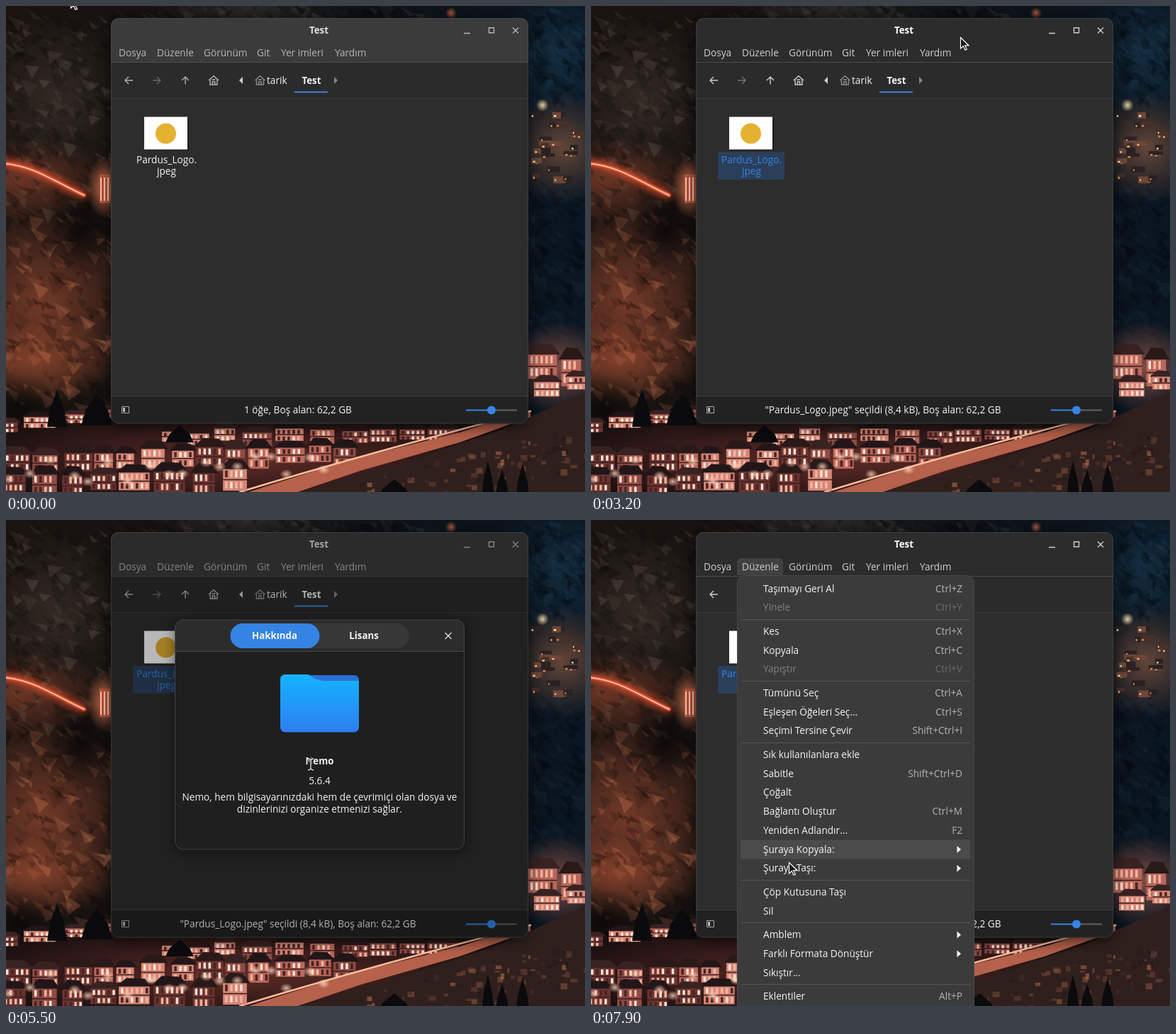
Animation, 817 px wide and 686 px high, one loop 8 s. Source, as an HTML page with a canvas:

```html
<!DOCTYPE html>
<html lang="tr">
<head>
<meta charset="utf-8">
<title>Test</title>
<style>
html, body { margin: 0; width: 100%; height: 100%; overflow: hidden; background: #0c0e12; }
canvas, svg { position: absolute; left: 0; top: 0; width: 817px; height: 686px; overflow: hidden; }
text { font: 13.65px "Open Sans", "Noto Sans", sans-serif; fill: #f4f4f4; cursor: default; }
.b { font-weight: 700; font-size: 13.3px; }
.m { text-anchor: middle; }
.e { text-anchor: end; }
.bar text { fill: #cfcfcf; }
.bar .b { fill: #fff; }
.ico { fill: none; stroke: #cdcdcd; stroke-width: 1.4; }
#dialog { filter: drop-shadow(0 3px 9px rgba(0, 0, 0, .5)); }
</style>
</head>
<body>
<canvas id="photo" width="817" height="686"></canvas>
<svg id="stage" viewBox="0 0 817 686">
  <defs>
    <path id="home" d="M-7 0 0-6.2 7 0M-5-1.5V6H5V-1.5M-1.7 6V2H1.7V6M-2.5-1H2.5" />
    <clipPath id="frame"><rect x="148" y="17" width="589" height="572.5" rx="11" /></clipPath>
    <linearGradient id="blue" x2="0" y2="1">
      <stop stop-color="#14b4ff" /><stop offset="1" stop-color="#2e7ef0" />
    </linearGradient>
  </defs>
  <g clip-path="url(#frame)">
    <path fill="#2d2d2d" d="M148 17h589v573H148z" />
    <path fill="#2c2c2c" d="M148 17h589v63H148z" />
    <path id="backdrop" fill="#3b3b3b" d="M148 17h589v63H148z" />
    <path fill="#2b2b2b" d="M148 80h589v50H148z" />
    <path fill="#222" d="M148 551h589v39H148z" />
    <path fill="#4c4c4c" d="M148 79h589v1H148z" />
    <path fill="#3b3b3b" d="M148 130h589v1H148zM148 550h589v1H148z" />
    <path id="openTab" fill="#414141" />
    <g id="head" class="bar">
      <text class="b m" x="441.5" y="39">Test</text>
      <text x="159" y="70.5">Dosya</text><text x="213" y="70.5">Düzenle</text>
      <text x="279" y="70.5">Görünüm</text><text x="354" y="70.5">Git</text>
      <text x="388" y="70.5">Yer imleri</text><text x="464" y="70.5">Yardım</text>
      <path class="ico" stroke-width="1.2" d="M646 38.5h9M681.5 30.8h7v7h-7zM715 30.5l8 8m0-8-8 8" />
      <path class="ico" d="M179 105H168m5-5-5 5 5 5M253 110.500V100m-5 5 5-5 5 5" />
      <path class="ico" opacity=".45" d="M207 105h11m-5-5 5 5-5 5" />
      <use href="#home" class="ico" x="293" y="105" />
    </g>
    <path fill="#d0d0d0" d="M334 100v10l-5-5z" />
    <path fill="#858585" d="M463 100v10l5-5z" />
    <use href="#home" class="ico" x="358.500" y="105" opacity=".6" />
    <text x="368" y="109.500">tarik</text>
    <text class="b m" x="431" y="109.500">Test</text>
    <path fill="#3584e4" d="M407 120.500h47v2h-47z" />
    <path fill="#111" opacity=".6" d="M196 158h62v46h-62z" />
    <path fill="#fff" d="M195 156.500h61v46h-61z" />
    <circle cx="225.500" cy="180" r="14.500" fill="#e5b130" />
    <rect id="mark" x="179" y="206" width="94" height="39" rx="2" fill="#2b3f5b" />
    <g id="label">
      <text class="m" x="226.500" y="221.500">Pardus_Logo.</text>
      <text class="m" x="226.500" y="238">jpeg</text>
    </g>
    <path fill="none" stroke="#aaa" d="M163.500 565.500h10v9h-10z" />
    <path fill="#bbb" d="M165 567h3v6h-3z" />
    <text id="status" class="m" x="412" y="575"></text>
    <path fill="#636363" d="M685 569.500h36v2h-36z" />
    <path fill="#3584e4" d="M649 569.500h36v2h-36z" />
    <circle cx="685" cy="570.500" r="6" fill="#3584e4" />
    <path id="dim" d="M148 17h589v573H148z" />
  </g>
  <rect x="148.500" y="17.500" width="588" height="571.500" rx="11" fill="none" stroke="#666" stroke-opacity=".3" />
  <g id="menus"></g>
  <g id="dialog"></g>
  <g id="pointer">
    <path id="arrow" fill="#151515" stroke="#fff" stroke-width="1.2" d="M.5.5V16l3.800-3.400 2.600 5.700 2.400-1.100-2.600-5.500h5.300z" />
    <g id="beam" fill="none">
      <path id="beamLine" stroke="#111" stroke-width="3.500" d="M-4-8q3 0 4 2 1-2 4-2M0-6V6M-4 8q3 0 4-2 1 2 4 2" />
      <use href="#beamTop" />
      <path stroke="#fff" stroke-width="1.300" d="M-4-8q3 0 4 2 1-2 4-2M0-6V6M-4 8q3 0 4-2 1 2 4 2" />
    </g>
  </g>
</svg>
<script>
const $ = id => document.getElementById(id);
const clamp = v => Math.max(0, Math.min(1, v));
const ramp = (t, a, b) => clamp((t - a) / (b - a));

function el(tag, attrs, parent, text) {
  const node = document.createElementNS('http://www.w3.org/2000/svg', tag);
  for (const k in attrs) node.setAttribute(k, attrs[k]);
  if (text) node.textContent = text;
  parent.append(node);
  return node;
}

/* Night town behind the window */
function paintPhoto() {
  const c = $('photo').getContext('2d');
  let seed = 11;
  const rnd = (a = 0, b = 1) => a + (b - a) * ((seed = seed * 16807 % 2147483647) / 2147483647);
  const pick = list => list[Math.floor(rnd(0, list.length))];
  const rect = (color, x, y, w, h) => { c.fillStyle = color; c.fillRect(x, y, w, h); };
  function poly(color, ...p) {
    c.fillStyle = color;
    c.beginPath();
    for (let i = 0; i < p.length; i += 2) c.lineTo(p[i], p[i + 1]);
    c.fill();
  }
  function glow(x, y, rx, ry, color, a) {
    c.save();
    c.translate(x, y);
    c.scale(rx, ry);
    c.globalAlpha = a;
    const g = c.createRadialGradient(0, 0, 0, 0, 0, 1);
    g.addColorStop(0, color);
    g.addColorStop(1, color + '00');
    c.fillStyle = g;
    c.fillRect(-1, -1, 2, 2);
    c.restore();
  }
  function rocks(n, x0, x1, y0, y1, dark, light) {
    for (let i = 0; i < n; i++) {
      const x = rnd(x0, x1), y = rnd(y0, y1), s = rnd(6, 26);
      c.globalAlpha = rnd(.06, .34);
      poly(rnd() < .62 ? dark : light, x, y, x + s, y + s * rnd(.1, .7), x + s * rnd(.2, .9), y + s * rnd(.6, 1.2));
    }
    c.globalAlpha = 1;
  }
  function house(x, y, w, h) {
    const wall = pick(['#b8675c', '#d48677', '#8d4b45', '#6a3532']);
    rect(wall, x, y, w, h);
    rect('#3a1c1c', x, y + h * .48, w, 1.5);
    for (let r = 0; r < 2; r++)
      for (let i = x + 3; i < x + w - 4; i += 7)
        rect(pick(['#ffe3d2', '#f5b39c', '#4a2322']), i, y + 3 + r * h * .5, 3.5, h * .3);
    poly(pick(['#2a1919', '#382222', '#221618']), x - 4, y + 1, x + w * .25, y - h * .42, x + w * .85, y - h * .38, x + w + 5, y + 1);
  }
  function row(x0, x1, y0, y1, h) {
    for (let x = x0; x < x1;) {
      const w = rnd(24, 46);
      house(x, y0 + (y1 - y0) * (x - x0) / (x1 - x0) + rnd(-4, 4), w, h * rnd(.8, 1.15));
      x += w + rnd(2, 12);
    }
  }
  const base = c.createLinearGradient(0, 0, 817, 0);
  base.addColorStop(0, '#1b1411');
  base.addColorStop(.3, '#15110f');
  base.addColorStop(.65, '#0d1116');
  base.addColorStop(1, '#0a1622');
  rect(base, 0, 0, 817, 686);
  glow(70, 130, 100, 120, '#4a4138', .5);
  glow(20, 245, 130, 60, '#a04a30', .6);
  glow(50, 420, 140, 150, '#914730', .75);
  glow(40, 500, 120, 60, '#c05a38', .5);
  glow(350, 0, 160, 40, '#3a3936', .6);
  glow(780, 70, 100, 90, '#17364c', .7);
  glow(785, 200, 80, 80, '#9c6547', .6);
  rocks(240, -20, 150, 0, 290, '#090808', '#6b5c50');
  rocks(260, -20, 150, 280, 560, '#0c0808', '#c57452');
  rocks(130, 730, 820, 0, 130, '#04080e', '#1d3c54');
  rocks(150, 730, 820, 245, 470, '#03060b', '#1c2e40');
  rocks(90, 140, 600, -10, 16, '#070707', '#4a463f');
  glow(105, 315, 50, 65, '#0a0808', .9);
  glow(15, 570, 60, 50, '#0a0707', .8);

  c.lineCap = 'round';
  c.shadowColor = '#ff5c38';
  c.shadowBlur = 12;
  for (const [width, color] of [[6, '#c9472f'], [2, '#ffc09a']]) {
    c.lineWidth = width;
    c.strokeStyle = color;
    c.beginPath();
    c.moveTo(-4, 222);
    c.bezierCurveTo(40, 226, 65, 246, 110, 267);
    c.stroke();
  }
  c.shadowBlur = 0;
  glow(140, 256, 26, 44, '#ff8a60', .8);
  rect('#b85440', 132, 238, 15, 40);
  for (let x = 133; x < 148; x += 5) rect('#ffc6a4', x, 242, 2, 33);

  for (let i = 0; i < 26; i++) {
    const x = rnd(735, 812), y = rnd(138, 242);
    rect(pick(['#2a2222', '#45302a', '#6d4737']), x, y, rnd(10, 22), rnd(5, 10));
    rect(pick(['#ffb36b', '#ffe0b4', '#e8834c']), x + 2, y + 4, rnd(1.5, 4), 2.5);
  }
  glow(757, 140, 9, 9, '#ffe4b0', .9);
  glow(628, 10, 8, 8, '#d56a45', .8);

  rect('#1b1011', 0, 588, 817, 98);
  glow(330, 640, 380, 70, '#7b372f', .7);
  glow(780, 510, 75, 65, '#b06452', .7);
  row(737, 800, 488, 500, 34);
  row(745, 830, 532, 520, 20);
  row(-10, 148, 586, 570, 14);
  row(220, 640, 600, 592, 18);
  row(-10, 500, 632, 618, 26);
  poly('#30201d', 400, 690, 560, 645, 700, 598, 817, 545, 817, 690);
  for (let i = 0; i < 110; i++) {
    const x = rnd(480, 817), y = Math.max(600, 686 - (x - 440) * .27) + rnd(0, 60);
    c.globalAlpha = rnd(.1, .45);
    rect(pick(['#e58a5e', '#8e5240', '#120d10']), x, y, rnd(2, 10), rnd(2, 9));
  }
  c.globalAlpha = 1;
  poly('#b5614b', 330, 690, 480, 642, 640, 602, 740, 570, 740, 580, 640, 616, 500, 656, 400, 690);
  c.lineWidth = 2.5;
  c.strokeStyle = '#ffbe9b';
  c.beginPath();
  c.moveTo(330, 686);
  c.quadraticCurveTo(500, 634, 740, 572);
  c.stroke();
  row(-12, 330, 664, 654, 28);
  for (let x = 4; x < 460; x += rnd(18, 34)) glow(x, 664 - x * .02 + rnd(-24, 14), 9, 7, '#ffd3ba', .8);
  for (const [x, y, w, h] of [[680, 668, 9, 26], [700, 676, 10, 22], [729, 672, 10, 26], [548, 682, 24, 14], [72, 568, 14, 26], [245, 604, 20, 12], [128, 570, 22, 22]])
    poly('#0b0a0d', x - w, y + h, x - w * .7, y, x, y - h, x + w * .7, y, x + w, y + h);

  c.shadowColor = 'rgba(0,0,0,.65)';
  c.shadowBlur = 22;
  c.shadowOffsetY = 4;
  c.fillStyle = '#222';
  c.beginPath();
  c.roundRect(149, 18, 587, 571, 11);
  c.fill();
}

/* Menus: "-" separator, "~" disabled, ">" submenu, "|" shortcut */
function menu(x, y, w, items) {
  const g = el('g', {}, $('menus')), right = x + w, rows = [];
  const box = el('rect', { x: x + .5, y: y + .5, width: w - 1, rx: 11, fill: '#3b3b3b', stroke: '#484848' }, g);
  const lit = el('rect', { x: x + 5, width: w - 11, height: 26.75, fill: '#4b4b4b' }, g);
  let cy = y + 19;
  for (const item of items) {
    if (item === '-') {
      el('rect', { x: x + 6, y: Math.round(cy - 10.500), width: w - 12, height: 1, fill: '#565656' }, g);
      cy += 6.75;
      continue;
    }
    const [name, key] = item.replace(/[~>]/g, '').split('|');
    const off = item[0] === '~';
    el('text', { x: x + 37, y: cy + 4.700, style: off ? 'fill:#808080' : '' }, g, name);
    if (key) el('text', { x: right - 17, y: cy + 4.700, class: 'e', style: `fill:${off ? '#6c6c6c' : '#b4b4b4'}` }, g, key);
    if (item.endsWith('>')) el('path', { d: `M${right - 24.500} ${cy - 5}v10l5.500-5z`, fill: '#f4f4f4' }, g);
    rows.push(cy);
    cy += 26.75;
  }
  box.setAttribute('height', cy - y - 8);
  return (opacity, pointerY) => {
    g.style.display = opacity ? '' : 'none';
    g.style.opacity = opacity;
    const hit = rows.find(r => Math.abs(r - pointerY) <= 13.4);
    lit.style.display = hit ? '' : 'none';
    if (hit) lit.setAttribute('y', hit - 13.4);
  };
}
const fileMenu = menu(236, 208, 253, ['Resim Görüntüleyici İle Aç', '-', 'Birlikte Aç>', '-', 'Kes', 'Kopyala', 'Çoğalt', '-',
  'Sık kullanılanlara ekle', 'Sabitle', 'Bağlantı Oluştur', 'Yeniden Adlandır...', '-', 'Çöp Kutusuna Taşı', 'Sil', '-',
  'Amblem>', 'Farklı Formata Dönüştür>', 'Sıkıştır...', '-', 'Özellikler']);
const helpMenu = menu(457, 78, 233, ['Tüm Konular|F1', 'Klavye Kısayolları|Ctrl+F1', 'Hakkında']);
const editMenu = menu(206, 78, 335, ['Taşımayı Geri Al|Ctrl+Z', '~Yinele|Ctrl+Y', '-', 'Kes|Ctrl+X', 'Kopyala|Ctrl+C', '~Yapıştır|Ctrl+V', '-',
  'Tümünü Seç|Ctrl+A', 'Eşleşen Öğeleri Seç...|Ctrl+S', 'Seçimi Tersine Çevir|Shift+Ctrl+I', '-',
  'Sık kullanılanlara ekle', 'Sabitle|Shift+Ctrl+D', 'Çoğalt', 'Bağlantı Oluştur|Ctrl+M', 'Yeniden Adlandır...|F2',
  'Şuraya Kopyala:>', 'Şuraya Taşı:>', '-', 'Çöp Kutusuna Taşı', 'Sil', '-',
  'Amblem>', 'Farklı Formata Dönüştür>', 'Sıkıştır...', '-', 'Eklentiler|Alt+P', 'Tercihler']);

/* About dialog: every part passes through a bending map */
const W = 408, H = 324;
const levels = [0, .14, .24, .49, .8, 1];
// per level: left, middle and right point of the bent row
const opening = [
  [290, 322, 376, 362, 457, 315], [293, 350, 386, 407, 457, 335], [318, 400, 432, 433, 470, 425],
  [335, 436, 434, 443, 470, 432], [405, 487, 435, 472, 457, 447], [410, 503, 440, 485, 459, 455]];
const closing = [
  [400, 248, 535, 306, 545, 288], [402, 285, 541, 312, 563, 308], [425, 310, 545, 318, 565, 312],
  [450, 340, 548, 330, 566, 313], [498, 368, 545, 350, 564, 315], [480, 395, 545, 372, 570, 320]];

function bend(pose, k, x, y) {
  const u = x / W, v = y / H;
  const wt = [2 * (u - .5) * (u - 1), 4 * u * (1 - u), 2 * u * (u - .5)];
  const at = (r, axis) => wt.reduce((sum, q, i) => sum + q * pose[r][2 * i + axis], 0);
  let i = 0;
  while (i < 4 && v > levels[i + 1]) i++;
  const f = (v - levels[i]) / (levels[i + 1] - levels[i]);
  return [238.5 + x, 141 + y].map((flat, axis) => flat * k + (at(i, axis) * (1 - f) + at(i + 1, axis) * f) * (1 - k));
}
function outline(x, y, w, h, r) {
  const pts = [], out = [];
  [[x + w - r, y + r], [x + w - r, y + h - r], [x + r, y + h - r], [x + r, y + r]].forEach(([cx, cy], q) => {
    for (let i = 0; i <= 8; i++) {
      const a = (q - 1 + i / 8) * Math.PI / 2;
      pts.push([cx + r * Math.cos(a), cy + r * Math.sin(a)]);
    }
  });
  pts.forEach((p, i) => {
    const next = pts[(i + 1) % pts.length], n = Math.ceil(Math.hypot(next[0] - p[0], next[1] - p[1]) / 12) || 1;
    for (let j = 0; j < n; j++) out.push([p[0] + (next[0] - p[0]) * j / n, p[1] + (next[1] - p[1]) * j / n]);
  });
  return out;
}
const parts = [], words = [];
function part(pts, attrs) {
  const node = el('path', attrs, $('dialog'));
  parts.push([node, pts]);
  return node;
}
function word(x, y, text, cls = '') {
  words.push([el('text', { class: 'm ' + cls }, $('dialog'), text), x, y]);
}
const card = outline(0, 0, W, H, 12);
part(card, { fill: '#1f1f1f' });
part(card.map(([x, y]) => [x, Math.min(y, 44)]), { fill: '#2c2c2c' });
part(outline(0, 44, W, 1, 0), { fill: '#434343' });
part(card, { fill: 'none', stroke: '#555', 'stroke-opacity': .7 });
part(outline(78, 5, 252, 35, 17.5), { fill: '#373737' });
part(outline(78, 5, 126, 35, 17.5), { fill: '#3584e4' });
const closeHover = part(outline(369.5, 6.5, 32, 32, 16), { fill: '#3d3d3d' });
const mid = [385.5, 22.5];
part([[381, 18], mid, [390, 27], mid, [390, 18], mid, [381, 27], mid], { fill: 'none', stroke: '#ddd', 'stroke-width': 1.3 });
part(outline(148.5, 78, 111, 70, 7), { fill: '#2a70d4' });
part(outline(148.5, 77, 111, 81.5, 7).map(([x, y]) => [x, Math.max(y, 77 + 9 * clamp((x - 188) / 14))]), { fill: 'url(#blue)' });
word(140.5, 27, 'Hakkında', 'b');
word(266.5, 27, 'Lisans', 'b');
word(204, 204, 'Nemo', 'b');
word(204, 231.5, '5.6.4');
word(204, 255, 'Nemo, hem bilgisayarınızdaki hem de çevrimiçi olan dosya ve');
word(204, 271.5, 'dizinlerinizi organize etmenizi sağlar.');

function drawDialog(t) {
  const shown = t >= 4400 && t < 6800, leaving = t >= 6500;
  $('dialog').style.display = shown ? '' : 'none';
  if (!shown) return;
  const pose = leaving ? closing : opening;
  const s = leaving ? 1 - ramp(t, 6400, 6700) : ramp(t, 4400, 4800);
  const k = s * (2 - s);
  $('dialog').style.opacity = leaving ? .35 + .65 * s : .5 + .5 * k;
  closeHover.style.display = t >= 6100 && !leaving ? '' : 'none';
  const map = (x, y) => bend(pose, k, x, y);
  for (const [node, pts] of parts)
    node.setAttribute('d', 'M' + pts.map(p => map(...p).map(n => n.toFixed(2))).join('L') + 'Z');
  for (const [node, x, y] of words) {
    const p = map(x, y), a = map(x + 1, y), b = map(x, y + 1);
    node.setAttribute('transform', `matrix(${[a[0] - p[0], a[1] - p[1], b[0] - p[0], b[1] - p[1], ...p]})`);
  }
}

// pointer route: time, x, y
const route = [[200, 91, -13], [300, 62, 2], [400, 28, 10], [600, 120, 105], [800, 222, 195], [900, 235, 207],
  [2300, 235, 207], [2400, 230, 180], [2600, 202, 104], [3100, 202, 104], [3200, 521, 44], [3300, 521, 44],
  [3500, 484, 62], [3900, 490, 152], [4200, 490, 152], [4400, 494, 183], [4800, 462, 330], [5100, 447, 387],
  [5500, 430, 345], [5700, 430, 345], [6100, 636, 157], [6200, 636, 157], [6300, 627, 150], [6400, 627, 150],
  [6700, 63, 60], [7200, 238, 62], [7300, 238, 62], [7400, 244, 92], [7800, 277, 462], [7900, 279, 483]];
function pointerAt(t) {
  const i = route.findIndex(p => p[0] >= t);
  if (i < 1) return route[0].slice(1);
  const [a, b] = [route[i - 1], route[i]], f = ramp(t, a[0], b[0]);
  return [a[1] + (b[1] - a[1]) * f, a[2] + (b[2] - a[2]) * f];
}

function statusAt(t) {
  if (t < 1100) return '1 öğe, Boş alan: 62,2 GB';
  if (t >= 3800 && t < 4300) return 'Nemo yaratıcılarının adlarını görüntüle';
  if (t >= 7400 && t < 7900) return '';
  return '"Pardus_Logo.jpeg" seçildi (8,4 kB), Boş alan: 62,2 GB';
}

function render(t) {
  const [x, y] = pointerAt(t), hoverY = pointerAt(t - 100)[1];
  const beam = t >= 5000 && t < 5800;
  $('pointer').setAttribute('transform', `translate(${x} ${y})`);
  $('arrow').style.display = beam ? 'none' : '';
  $('beam').style.display = beam ? '' : 'none';

  const focus = t < 4400 ? ramp(t, 1000, 1400) : t < 6500 ? 1 - ramp(t, 4400, 4800) : ramp(t, 6400, 6700);
  $('backdrop').style.opacity = 1 - focus;
  $('head').style.opacity = .84 + .16 * focus;
  $('dim').style.opacity = .28 * (t < 6500 ? ramp(t, 4300, 4800) : .06 + .94 * ramp(-t, -6700, -6400)) * (t < 6800);

  const selected = t >= 1100;
  $('mark').style.opacity = selected ? 1 : t >= 900 ? .35 : 0;
  for (const line of $('label').children) line.style.fill = selected ? '#3584e4' : '#f4f4f4';
  $('status').textContent = statusAt(t);

  const help = t >= 3500 && t < 4300, edit = t >= 7200;
  fileMenu(t < 3200 ? ramp(t, 1500, 1800) : 0, -1);
  helpMenu(help ? ramp(t, 3400, 3700) : 0, hoverY);
  editMenu(edit ? ramp(t, 7100, 7300) : 0, hoverY);
  $('openTab').setAttribute('d', help ? 'M457 79V60q0-6 6-6h48q6 0 6 6v19z' : edit ? 'M206 78V60q0-6 6-6h53q6 0 6 6v18z' : 'M0 0');
  drawDialog(t);
}

paintPhoto();
const start = performance.now();
let last = -1;
function tick() {
  const t = Math.floor((performance.now() - start) % 8000 / 100) * 100;
  if (t !== last) render(last = t);
  requestAnimationFrame(tick);
}
tick();
</script>
</body>
</html>
```
